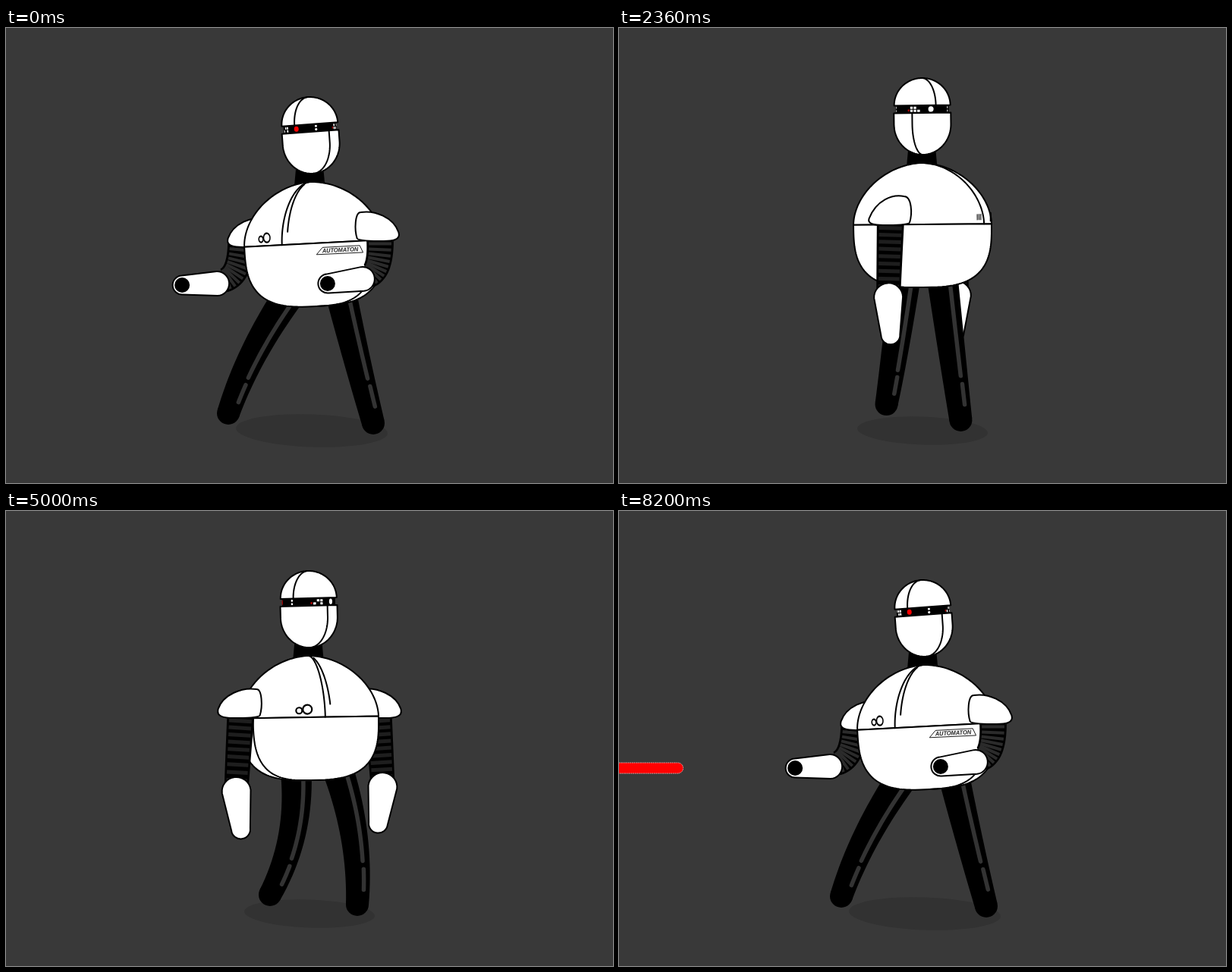
Recreate the animation shown at these times as an HTML page with a canvas. Size 800 px wide and 600 px high, loop 8.24 s.

```html
<!DOCTYPE html>
<html lang="en">
<head>
<meta charset="utf-8">
<title>Robot</title>
<style>
html, body { margin: 0; width: 100%; height: 100%; overflow: hidden; background: #393939; }
canvas { display: block; }
</style>
</head>
<body>
<canvas id="stage" width="800" height="600"></canvas>
<script>
const ctx = document.getElementById('stage').getContext('2d');
const LOOP = 8240, WALK_START = 1640, WALK_END = 5960, STEP = 480;
const { PI, sin, cos, sign, abs, min, max } = Math;
const rad = d => d * PI / 180;
const mix = (a, b, k) => a + (b - a) * k;
const mixAll = (a, b, k) => a.map((v, i) => mix(v, b[i], k));
const lin = (t, a, b) => min(1, max(0, (t - a) / (b - a)));
const ramp = (t, a, b) => { const k = lin(t, a, b); return k * k * (3 - 2 * k); };
const bump = (t, a, b) => sin(PI * lin(t, a, b));
const list = (n, f) => Array.from({ length: n }, (_, i) => f(i));

// Leg poses: hip x, bend x, foot x, foot y
const STAND = { left: [373, 339, 357, 514], right: [415, 410, 438, 515] };
const STRIDE = { left: [382, 389, 348, 506], right: [437, 468, 463, 519] };
const AIM = { left: [368, 314, 293, 508], right: [437, 455, 484, 521] };

// Body spin in degrees at a few moments
const SPIN = [[880, -27], [1680, 120], [3080, 373], [5000, 733], [6160, 997], [6600, 1053]];
const spinAt = t => SPIN.slice(1).reduce((sum, [t1, a1], i) =>
  sum + (a1 - SPIN[i][1]) * lin(t, SPIN[i][0], t1), SPIN[0][1]);

function poseAt(t) {
  const walking = t >= WALK_START && t < WALK_END;
  const phase = (t - 3080) / STEP * PI;
  const lift = walking ? sin(phase) : 0;
  const stride = walking ? (1 + cos(phase)) / 2 : t < WALK_START ? 0 : 1 - .7 * ramp(t, WALK_END, 6140);
  const aim = 1 - ramp(t, 60, 760) + ramp(t, 6200, 6560);
  const hop = bump(t, 6090, 6570);
  const slide = ramp(t, 6160, 6640) - ramp(t, 7200, 8160);
  const look = ramp(t, 880, 1680), back = ramp(t, 3080, 5000);
  const x = 400 + 5 * aim - 20 * slide;
  const tilt = -3 * aim - stride * (1 - aim);
  const turn = spinAt(t);

  const leg = side => {
    const [hip, bend, fx, fy] = mixAll(mixAll(STAND[side], STRIDE[side], stride), AIM[side], aim);
    const raise = 14 * max(0, side === 'left' ? lift : -lift) + 62 * hop;
    const planted = side === 'left' ? 0 : -26 * slide;
    return [hip + x - 400, bend + x - 400, fx + planted, fy - raise, 430 - 62 * hop];
  };

  return {
    x, aim, tilt, turn,
    y: 12 * aim - 62 * hop - 13 * abs(lift) ** 3,
    legs: [leg('left'), leg('right')],
    out: .7 * bump(t, 60, 780) + bump(t, 5450, 6150),
    base: turn + 85 - 153 * lin(t, 880, 1680) - 207 * lin(t, 5000, 6650),
    headX: 1.6 * tilt,
    headTilt: 1.4 * tilt + 8 * hop,
    seam: -33 + 62 * (look - back) + 30 * hop,
    visor: -31 - 89 * look + 37 * back + 52 * ramp(t, 5000, 6160) + 30 * hop,
    shade: 86 + 14 * aim - 18 * hop
  };
}

function fill(color) {
  ctx.fillStyle = color;
  ctx.fill();
}

function outline(color = '#fff', width = 2) {
  fill(color);
  ctx.strokeStyle = '#000';
  ctx.lineWidth = width;
  ctx.stroke();
}

function trace(points) {
  ctx.beginPath();
  points.forEach(p => ctx.lineTo(p[0], p[1]));
}

function line(points, color, width, cap = 'round') {
  trace(points);
  ctx.strokeStyle = color;
  ctx.lineWidth = width;
  ctx.lineCap = cap;
  ctx.stroke();
}

function dot(x, y, r, color) {
  ctx.beginPath();
  ctx.arc(x, y, r, 0, 2 * PI);
  fill(color);
}

// Tapered tube along a bent line; returns a function giving points on it
function tube(a, c, b, w0, w1) {
  const on = (u, side) => {
    const p = i => (1 - u) ** 2 * a[i] + 2 * u * (1 - u) * c[i] + u * u * b[i];
    const d = i => (1 - u) * (c[i] - a[i]) + u * (b[i] - c[i]);
    const n = Math.hypot(d(0), d(1)) || 1, w = side * mix(w0, w1, u);
    return [p(0) + d(1) / n * w, p(1) - d(0) / n * w];
  };
  on.span = (u0, u1, side) => list(21, i => on(mix(u0, u1, i / 20), side));
  trace(on.span(0, 1, 1).concat(on.span(1, 0, -1)));
  fill('#000');
  return on;
}

function drawLeg([hip, bend, fx, fy, by], hipY) {
  const on = tube([hip, hipY], [bend, by], [fx, fy], 20.5, 15);
  dot(fx, fy, 15, '#000');
  line(on.span(.02, .68, .45), '#333', 5.5);
  line(on.span(.74, .89, .5), '#333', 5.5);
}

function arm(v, side) {
  const alpha = rad(v.turn + side * 90), s = sin(alpha), behind = cos(alpha) < 0;
  const p = v.aim, dir = s < 0 ? -1 : 1, k = abs(s);
  const x = v.x + 93 * s, y = v.y + 272 + (behind ? 4 : -4) * p;
  const swing = dir * v.out;
  const hang = [6 * s + 34 * swing, 95 - 3 * s - 10 * v.out, 64 * swing, 144 - 4 * s - 28 * v.out];
  const aimed = behind ? [-44, 49, -90, 51] : [-18, 51, -64, 57];
  const [ex, ey, hx, hy] = mixAll(hang, aimed, p);
  const on = tube(
    [x + (behind ? -12 : 5) * p, y - 4],
    [x + mix(ex / 2, behind ? -14 : 7, p), y + 40],
    [x + ex + 8 * p, y + ey - 4], 18, 16);
  for (let i = 1; i < 10; i++) {
    line([on(i / 10, -.84), on(i / 10, .84)], mix(0, 1, p) > .5 ? '#2b2b2b' : '#1e1e1e', 5 - p, 'butt');
  }

  const a = Math.atan2(hy - ey, hx - ex), q = PI / 2;
  ctx.beginPath();
  ctx.arc(x + ex, y + ey, mix(19, 16, p), a + q, a + 3 * q);
  ctx.arc(x + hx, y + hy, 12.5, a - q, a + q);
  ctx.closePath();
  outline();
  if (p > .3) dot(x + hx, y + hy, 10 * p, '#000');

  ctx.save();
  ctx.translate(x, y);
  ctx.scale(dir, 1);
  ctx.beginPath();
  ctx.moveTo(-25, -2);
  ctx.bezierCurveTo(-29, -14, -28, -37, -15 - 6 * k, -37);
  ctx.bezierCurveTo(-2, -40, 14 + 10 * k, -34 + 4 * k, 27 + 3 * k, -5 - 6 * k);
  ctx.bezierCurveTo(29 + 4 * k, 0, 20, 1, 10, 1);
  ctx.quadraticCurveTo(-20, 1, -25, -2);
  outline();
  ctx.restore();
}

// Half widths of the rounded parts at a given height
const round = (r, h, n) => y => r * max(0, 1 - abs(y / h) ** n) ** (1 / n);
const domeWidth = round(91, 81, 1.85);
const bowlWidth = round(91, 83, 3);
const capWidth = y => round(37, 36, 2)(y + 5);
const jawWidth = y => round(37.5, 40, 2)(max(0, y - 20));

const profile = (width, y0, y1, s) => list(41, i => {
  const y = mix(y0, y1, sin(i / 40 * PI / 2));
  return [width(y) * s, y];
});

// Closed shape mirrored around the vertical axis
function shell(width, y0, y1) {
  trace([...profile(width, y0, y1, -1), ...profile(width, y0, y1, 1).reverse()]);
  ctx.closePath();
}

function seam(width, lon, y0, y1) {
  if (cos(rad(lon)) > 0) line(profile(width, y0, y1, sin(rad(lon))), '#000', 2);
}

// Flat mark placed on a turned body
function mark(lon, y, r, draw) {
  const c = cos(rad(lon));
  if (c < .12) return;
  ctx.save();
  ctx.translate(r * sin(rad(lon)), y);
  ctx.scale(c, 1);
  draw();
  ctx.restore();
}

function ring(x, y, r) {
  ctx.beginPath();
  ctx.arc(x, y, r, 0, 2 * PI);
  outline('#fff', 2.2);
}

function label() {
  trace([[-33, 5], [-24, -4], [29, -4], [33, 5]]);
  ctx.closePath();
  outline('#fff', .9);
  ctx.fillStyle = '#222';
  ctx.font = 'italic bold 8px "Liberation Sans", Arial, sans-serif';
  ctx.textAlign = 'center';
  ctx.textBaseline = 'middle';
  ctx.fillText('AUTOMATON', 1, 1);
}

function torso(v) {
  const back = v.turn + 180;
  ctx.save();
  ctx.translate(v.x, v.y + 272);
  ctx.rotate(rad(v.tilt));
  ctx.lineJoin = 'round';
  shell(domeWidth, 0, -81);
  outline();
  shell(bowlWidth, 0, 83);
  outline();
  seam(domeWidth, v.turn, 0, -81);
  seam(domeWidth, v.turn + 5, -17, -78);
  seam(domeWidth, back, 0, -81);
  mark(v.turn - 18, -9, 91, () => { ring(-6, 0, 4); ring(5, -1.5, 6); });
  mark(back + 18, -9, 91, () => { ctx.fillStyle = '#000'; ctx.fillRect(-7, -6, 14, 12); });
  mark(back - 8, -9, 91, () => [-4, 0, 4].forEach(x => line([[x, -4], [x, 4]], '#000', 2, 'butt')));
  seam(bowlWidth, v.base, 0, 83);
  mark(v.base - 36, 10, 91, label);
  ctx.restore();
}

function neck(v) {
  const x = v.x + v.headX, y = v.y;
  trace([[x - 18, y + 172], [x + 18, y + 172], [x + 20, y + 194], [x - 20, y + 194]]);
  fill('#000');
}

function head(v, t) {
  ctx.save();
  ctx.translate(v.x + v.headX + .5, v.y + 120);
  ctx.rotate(rad(v.headTilt));
  ctx.lineJoin = 'round';
  ctx.fillStyle = '#000';
  ctx.fillRect(-35, -6, 70, 12);
  shell(capWidth, -5, -41);
  outline();
  seam(capWidth, v.seam, -5, -41);
  shell(jawWidth, 5, 60);
  outline();
  seam(jawWidth, 8 - v.seam, 5, 60);

  const light = (lon, draw) => mark(v.visor + lon, 0, 35, draw);
  const lamp = (lon, r, color, y = 0) => light(lon, () => dot(0, y, r, color));
  const colon = lon => [-2.2, 2.2].forEach(y => lamp(lon, 1.6, '#fff', y));
  const cells = (lon, shift) => {
    for (let i = 0; i < 6; i++) {
      if ((i * 5 + Math.floor(t / 200) + shift) % 4 === 0) continue;
      light(lon + (i % 3 - 1) * 8, () => {
        ctx.fillStyle = '#fff';
        ctx.fillRect(-1.8, i < 3 ? -3.4 : .6, 3.6, 3);
      });
    }
  };
  cells(-35, 0);
  lamp(0, 3.5, '#f00');
  colon(44);
  lamp(89, 1.5, '#a00', 1.5);
  cells(104, 3);
  lamp(139, 3.7, '#fff');
  colon(191);
  ctx.restore();
}

function beams(t) {
  for (let i = 6; i >= 0; i--) {
    const d = .61 * (t - 6700 - 173 * i);
    if (d < 14 || d > 370) continue;
    ctx.beginPath();
    ctx.roundRect(235 - d, d > 132 ? 332 : 330.5, min(d, 132), 14, 7);
    fill('#f00');
    ctx.strokeStyle = '#f5b0b0';
    ctx.lineWidth = 1;
    ctx.setLineDash([1.5, 1]);
    ctx.stroke();
    ctx.setLineDash([]);
  }
}

function draw(t) {
  const v = poseAt(t);
  const front = side => cos(rad(v.turn + side * 90)) >= 0;
  ctx.fillStyle = '#393939';
  ctx.fillRect(0, 0, 800, 600);
  ctx.beginPath();
  ctx.ellipse(mix(400, v.x, .6), 531, v.shade, v.shade * .215, rad(2), 0, 2 * PI);
  fill('#323232');

  [-1, 1].filter(s => !front(s)).forEach(s => arm(v, s));
  v.legs.forEach(l => drawLeg(l, v.y + 340));
  neck(v);
  torso(v);
  [-1, 1].filter(front).forEach(s => arm(v, s));
  head(v, t);
  beams(t);
}

const start = performance.now();
function tick() {
  draw((performance.now() - start) % LOOP);
  requestAnimationFrame(tick);
}
tick();
</script>
</body>
</html>
```
